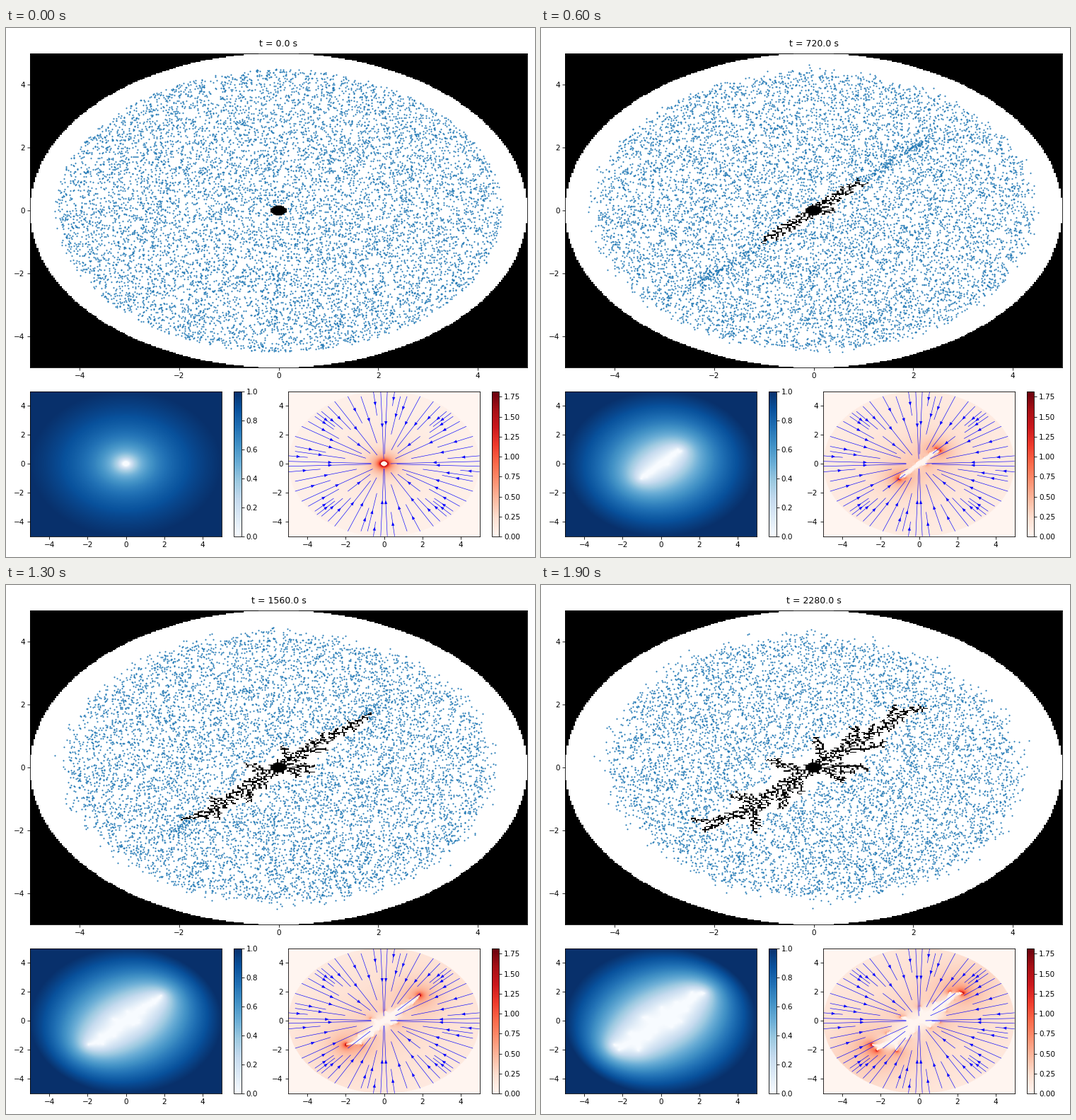
A matplotlib script for the animation above (2000 ms loop, 748x748 px).

```python
import numpy as np
import matplotlib.pyplot as plt
from matplotlib.animation import FuncAnimation
from matplotlib.collections import PolyCollection

SIZE, FRAMES, DT = 748, 20, 120
N = 300
H = 10 / N
R_SEED, R_WALL = 0.16, 5.0
STEP, GAP = 0.04, 0.055

rng = np.random.default_rng(7)
c = (np.arange(N) + 0.5) * H - 5
X, Y = np.meshgrid(c, c)
R = np.hypot(X, Y)

# x0, y0, x1, y1, half width, start, end (in steps)
BRANCHES = [
    (0, 0, 1.05, 1.0, .17, 0, 6), (1.05, 1.0, 1.6, 1.45, .18, 6, 10),
    (1.6, 1.45, 1.83, 1.75, .12, 10, 13), (1.83, 1.75, 2.33, 1.95, .12, 13, 19),
    (1.45, 1.45, 1.65, 2.1, .1, 14, 19), (.65, .65, .85, 1.4, .12, 9, 19),
    (.2, .2, .05, .95, .1, 5, 17), (.2, 0, 1.1, -.05, .18, 3, 19),
    (.2, -.05, .65, -.5, .1, 7, 19), (.7, .5, 1.45, .8, .12, 9, 18),
    (0, 0, -1.05, -1.05, .17, 0, 6), (-1.05, -1.05, -1.45, -1.55, .2, 6, 10),
    (-1.4, -1.45, -2.05, -1.7, .14, 10, 13), (-2.05, -1.7, -2.5, -1.65, .1, 13, 19),
    (-1.85, -1.75, -2.25, -2.05, .1, 13, 19), (-1.25, -1.3, -1.1, -2.15, .12, 9, 19),
    (-1.15, -1.1, -1.65, -.8, .14, 9, 18), (-.3, -.1, -.95, .3, .13, 6, 19),
    (-.3, -.4, -.3, -.9, .12, 7, 19), (-.6, -.75, -.6, -1.4, .12, 7, 18),
]


def cell(p):
    return tuple(np.clip(((p + 5) / H).astype(int), 0, N - 1).T[::-1])


def grow():
    """Random tree that spreads along the branches; one mask per step."""
    nodes = np.zeros((12000, 2))
    ring = np.arange(12) * np.pi / 6
    nodes[:12] = 0.14 * np.column_stack([np.cos(ring), np.sin(ring)])
    n = 12
    mask = R < R_SEED
    masks = [mask.copy()]
    for t in range(1, FRAMES):
        active = [b for b in BRANCHES if b[5] < t]
        for _ in range(500):
            x0, y0, x1, y1, w, t0, t1 = active[rng.integers(len(active))]
            u = rng.random() * min(1, (t - t0) / (t1 - t0))
            w *= min(1, 0.4 + 0.08 * (t - t0))
            goal = np.array([x0 + u * (x1 - x0), y0 + u * (y1 - y0)])
            goal += rng.uniform(-w, w, 2)
            d = goal - nodes[:n]
            dist = np.hypot(d[:, 0], d[:, 1])
            j = dist.argmin()
            if dist[j] < GAP:
                continue
            new = nodes[j] + d[j] / dist[j] * STEP + rng.normal(0, 0.01, 2)
            mask[cell((new + nodes[j]) / 2)] = True
            mask[cell(new)] = True
            nodes[n] = new
            n += 1
        masks.append(mask.copy())
    return masks


def relax(u, free, sweeps, omega=1.97):
    """Red-black over-relaxation of the Laplace equation, in place."""
    w = omega * free
    for _ in range(sweeps):
        for i, j in ((1, 1), (2, 2), (1, 2), (2, 1)):
            v = u[i:-1:2, j:-1:2]
            near = (u[i - 1:-2:2, j:-1:2] + u[i + 1::2, j:-1:2]
                    + u[i:-1:2, j - 1:-2:2] + u[i:-1:2, j + 1::2])
            v += w[i:-1:2, j:-1:2] * (near / 4 - v)


def simulate(n_gas=10000, n_line=500, mobility=0.13, jitter=0.03):
    r = 4.5 * np.sqrt(rng.random(n_gas))
    a = rng.random(n_gas) * 2 * np.pi
    pos = np.column_stack([r * np.cos(a), r * np.sin(a)])
    s = rng.uniform(0.3, 2.35, n_line) * rng.choice([-1, 1], n_line)
    line = s[:, None] + rng.normal(0, 1, (n_line, 2)) * (0.01 + 0.025 * np.abs(s[:, None]))
    u = np.clip(np.log(R / R_SEED) / np.log(R_WALL / R_SEED), 0, 1)
    states = []
    for t, mask in enumerate(grow()):
        free = ((R < R_WALL) & ~mask).astype(float)
        u[mask] = 0
        relax(u, free, 120)
        gy, gx = np.gradient(u, H)
        if t:
            k = cell(pos)
            pos = pos - mobility * np.column_stack([gx[k], gy[k]])
            pos += rng.normal(0, jitter, pos.shape)
        if t == 1:
            pos = np.vstack([pos, line])
        pos = pos[u[cell(pos)] > 0.02]
        states.append((free, u.copy(), np.hypot(gx, gy) * free, pos))
    return states


states = simulate()

fig = plt.figure(figsize=(10, 10), dpi=SIZE / 10, facecolor="white")


def panel(x0, y0, x1, y1):
    return fig.add_axes([x0 / SIZE, 1 - y1 / SIZE, (x1 - x0) / SIZE, (y1 - y0) / SIZE])


def image(ax, data, cmap, vmax, **kw):
    return ax.imshow(data, cmap=cmap, vmin=0, vmax=vmax, origin="lower",
                     extent=(-5, 5, -5, 5), aspect="auto", **kw)


ax = panel(34, 36, 737, 480)
ax_u = panel(34, 513.5, 305, 719)
ax_e = panel(399, 513.5, 670, 719)
free, u, mag, pos = states[0]
im = image(ax, free, "gray", 1, interpolation="nearest")
dots, = ax.plot(pos[:, 0], pos[:, 1], "o", ms=1, color="tab:blue")
title = ax.set_title("t = 0.0 s", pad=9.8)
im_u = image(ax_u, u, "Blues", 1)
im_e = image(ax_e, mag, "Reds", 1.82)
fig.colorbar(im_u, cax=panel(322, 513.5, 332.5, 719))
fig.colorbar(im_e, cax=panel(686.5, 513.5, 697, 719))

# field lines of the bare seed
flow = -free / R**2
stream = ax_e.streamplot(c, c, X * flow, Y * flow, color="blue", linewidth=0.6)
for patch in list(ax_e.patches):
    patch.remove()
paths = []
for seg in stream.lines.get_segments():
    if paths and np.allclose(paths[-1][-1], seg[0]):
        paths[-1].extend(seg[1:])
    else:
        paths.append(list(seg))
paths = [np.array(p) for p in paths]
heads = ax_e.add_collection(PolyCollection([], facecolor="blue", edgecolor="blue",
                                           linewidth=0.4, zorder=3))
for a in (ax, ax_u, ax_e):
    a.set(xlim=(-5, 5), ylim=(-5, 5), xticks=range(-4, 5, 2), yticks=range(-4, 5, 2))

PX = np.array([27.1, 20.55])


def arrowheads(u):
    verts = []
    for p in paths:
        q = p[u[cell(p)] > 0.02]
        if len(q) < 3:
            continue
        mid = (q[0] + q[-1]) / 2 * PX
        d = -mid / np.hypot(*mid)
        side = np.array([-d[1], d[0]])
        tri = [mid + 2.4 * d, mid - 2 * d + 1.8 * side, mid - 2 * d - 1.8 * side]
        verts.append(np.array(tri) / PX)
    return verts


def update(i):
    free, u, mag, pos = states[i]
    im.set_data(free)
    dots.set_data(pos[:, 0], pos[:, 1])
    im_u.set_data(u)
    im_e.set_data(mag)
    heads.set_verts(arrowheads(u))
    title.set_text(f"t = {DT * i:.1f} s")
    return im, dots, im_u, im_e, heads, title


anim = FuncAnimation(fig, update, frames=FRAMES, interval=100,
                     init_func=lambda: update(0), repeat=True, repeat_delay=0)
plt.show()
```
